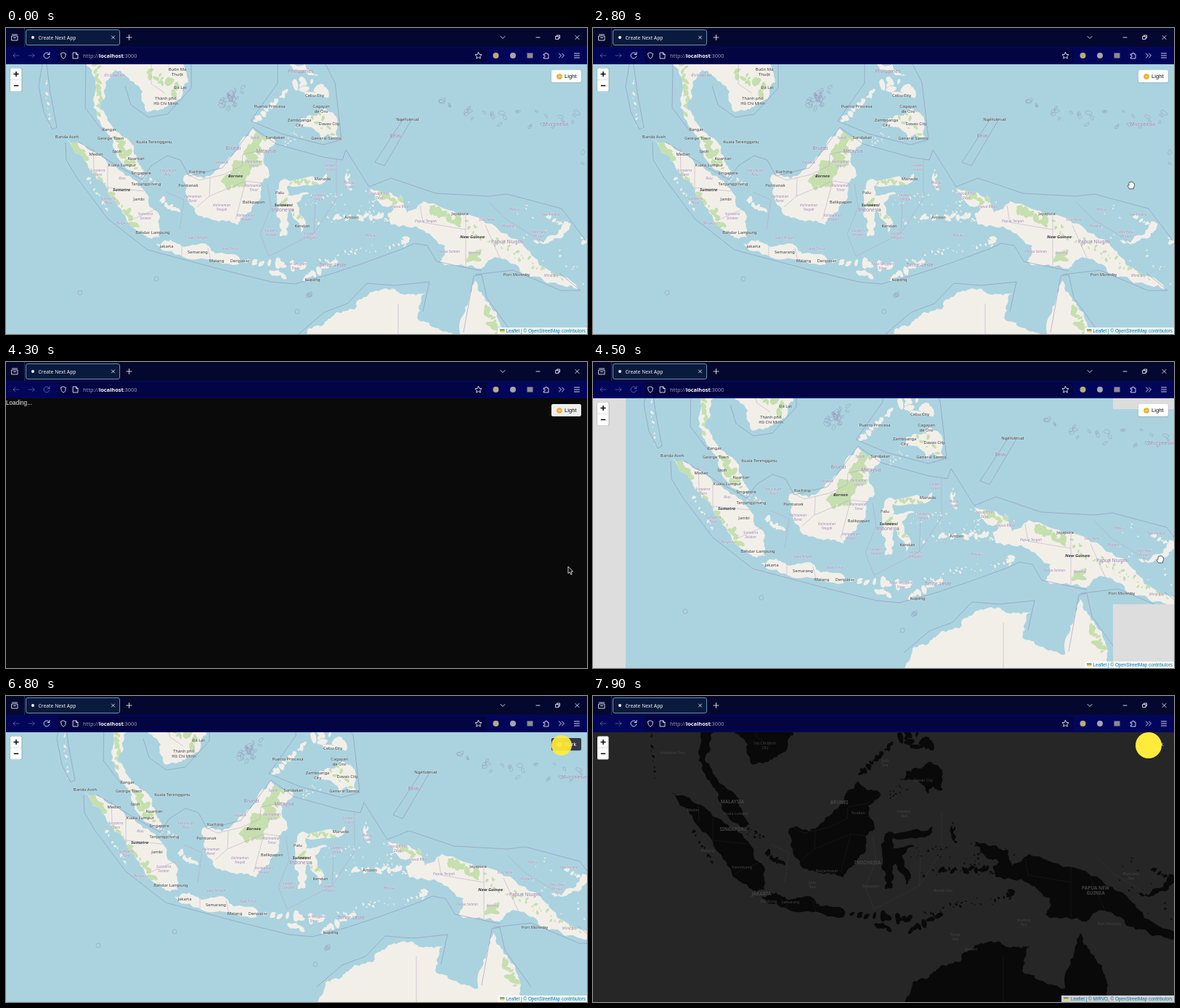
An HTML page that plays this animation: 800x422 px, repeating every 8 s.

```html
<!DOCTYPE html>
<html lang="en">
<head>
<meta charset="utf-8">
<title>Map theme toggle</title>
<style>
html, body { margin: 0; height: 100%; overflow: hidden; background: #0a0a0a; }
svg { display: block; width: 100vw; height: 100vh; }
text { font-family: "Noto Sans", "Open Sans", sans-serif; }
.arial { font-family: "Liberation Sans", Arial, sans-serif; }
.names text { text-anchor: middle; }
#labels text { paint-order: stroke; stroke: #fff8; stroke-width: .7px; }
.city { font-size: 5.8px; fill: #333; }
.country { font-size: 6.7px; fill: #8d76a3; }
.isle { font-size: 6px; font-weight: 700; font-style: italic; fill: #333; }
.prov { font-size: 4.7px; font-style: italic; fill: #9a80ae; }
.dim { font-size: 5.2px; fill: #454545; }
.big { font-size: 6.4px; font-weight: 600; fill: #454545; }
.icon { fill: none; stroke: #e8e8f4; stroke-width: .9; stroke-linecap: round; stroke-linejoin: round; }
</style>
</head>
<body>
<svg viewBox="0 0 800 422" preserveAspectRatio="none">
<defs>
  <radialGradient id="sun"><stop offset="0" stop-color="#ffd75a"/><stop offset="1" stop-color="#dfa024"/></radialGradient>
  <clipPath id="page"><rect y="50" width="800" height="372"/></clipPath>
  <clipPath id="coast"><path id="land"/></clipPath>
</defs>

<g clip-path="url(#page)">
  <g id="light">
    <rect y="50" width="800" height="372" fill="#aad3df"/>
    <g class="pan">
      <use href="#land" fill="#f2efe9"/>
      <path id="forest" clip-path="url(#coast)" fill="#c5dfae"/>
      <path id="reefs" fill="none" stroke="#8f8db0" stroke-width=".6" opacity=".75"/>
      <path id="borders" fill="none" stroke="#8f84b3" stroke-width=".7" opacity=".75"/>
      <path id="inner" fill="none" stroke="#b5a0bd" stroke-width=".5"/>
      <g id="labels" class="names"></g>
    </g>
    <path id="missing" fill="#ddd" d="M0 50H45V422H0ZM716 50H800V65H716ZM716 334H800V422H716Z"/>
  </g>
  <g id="dark">
    <rect y="50" width="800" height="372" fill="#262626"/>
    <g class="pan">
      <use href="#land" fill="#090909"/>
      <use href="#inner" opacity=".15"/>
      <g id="darkLabels" class="names"></g>
    </g>
  </g>
  <rect x="5.5" y="55" width="17" height="33" rx="2" fill="#0003"/>
  <rect x="6" y="55.5" width="15.5" height="32" rx="1.5" fill="#fff"/>
  <path d="M6 71.5H21.5" stroke="#ccc" stroke-width=".6"/>
  <path d="M10.5 63.5H17.5M14 60V67M10.8 79.5H17.2" stroke="#000" stroke-width="1.4"/>
  <g id="credit">
    <rect y="413" width="160" height="9" fill="#fffc"/>
    <path d="M3 415.5h6.5v2H3z" fill="#4c7be1"/><path d="M3 417.5h6.5v2H3z" fill="#ffd500"/>
  </g>
  <text id="creditText" class="arial" x="798" y="419.7" text-anchor="end" font-size="6.3" fill="#0078a8"></text>
  <g id="loading">
    <rect y="50" width="800" height="372" fill="#0a0a0a"/>
    <text class="arial" y="59.2" font-size="8.2" fill="#ededed">Loading...</text>
  </g>
  <rect x="750.5" y="58" width="42" height="18" rx="2.5" fill="#0002"/>
  <rect id="button" x="751" y="58" width="41" height="17" rx="2.2"/>
  <circle cx="762" cy="67" r="3.8" fill="url(#sun)"/>
  <text id="mode" class="arial" x="769" y="69.3" font-size="7.7"></text>
  <g id="status">
    <rect y="410" width="154.5" height="12" fill="#1c1b22"/>
    <text x="2" y="418.7" font-size="6.6" fill="#f4f4f8">Waiting for localhost...</text>
  </g>
</g>

<rect width="800" height="26" fill="#05082e"/>
<rect y="26" width="800" height="24" fill="#02065a"/>
<rect x="71" y="28" width="591" height="20" rx="2" fill="#030442"/>
<path d="M25.5 0V26" stroke="#22305c"/>
<rect x="27.5" y="2.5" width="129" height="21" rx="2.5" fill="#0a1a3c" stroke="#6391b5"/>
<circle id="favicon" cx="37" cy="13" r="2" fill="#fff"/>
<circle id="spinner" cy="13" r="1.1" fill="#6db4ff"/>
<text x="44.5" y="15.6" font-size="6.8" fill="#f4f4fa">Create Next App</text>
<g class="icon">
  <path d="M145.5 11l4 4m0-4l-4 4M166 13h7M169.5 9.5v7M681 11.500l3 3 3-3M730 13h5M757 11.500h4v4h-4zM758.500 11.500v-1.500h4v4h-1.500M784 10.500l5 5m0-5l-5 5"/>
  <path d="M8 11h8v6H8zM8.500 9h7M10.500 13.500h3"/>
  <path d="M18 38h-8m3-3l-3 3 3 3M31 38h8m-3-3l3 3-3 3" opacity=".35"/>
  <path id="reload" d="M59.500 36a4 4 0 1 0 .4 3M60 33.500v3h-3"/>
  <path id="stop" d="M53 35l6 6m0-6l-6 6"/>
  <path d="M79 34l3.500 1.500q0 5-3.500 7-3.500-2-3.500-7zM92.500 34h4l2.500 2.500v5.500h-6.500zM96.500 34v2.500h2.500"/>
  <path d="M650.500 33.500l1.400 2.900 3.100.4-2.300 2.200.6 3.100-2.800-1.500-2.800 1.500.6-3.100-2.300-2.200 3.100-.4z"/>
  <path d="M740.500 36h2a1.300 1.300 0 1 1 2.500 0h2v6h-6.500v-2a1.300 1.300 0 1 0 0-2.500zM761.500 35l3 3-3 3M765.500 35l3 3-3 3M782.500 35h7M782.500 38h7M782.500 41h7"/>
</g>
<circle cx="674.500" cy="38" r="4" fill="#b9ad79"/>
<circle cx="698" cy="38" r="4" fill="#a5a5ae"/>
<rect x="717.500" y="34.500" width="8" height="7" fill="#8b8b90"/>
<text x="106" y="40.700" font-size="7.400" fill="#9a9bb8">http://<tspan fill="#fff" font-weight="600">localhost</tspan>:3000</text>

<circle id="click" cx="765" cy="68" fill="#ffeb3b"/>
<g id="cursor">
  <path id="arrow" d="M0 0V9.500L2.200 7.500 3.700 11 5.300 10.300 3.800 7H6.700Z" stroke="#fff" stroke-width=".8"/>
  <path id="hand" d="M-2.500 5L-5 .5Q-4.500-1-3 .5V-3.500Q-2-5-1.200-3.500-.5-6 .8-4.500 2.500-5.500 3-3 5-3 4.600-.5L3.300 5Z" fill="#fff" stroke="#000" stroke-width=".6"/>
</g>
</svg>

<script>
const el = id => document.getElementById(id);
const set = (id, attrs) => { for (const k in attrs) el(id).setAttribute(k, attrs[k]); };
let seed = 7;
const rnd = () => (seed = seed * 16807 % 2147483647) / 2147483647;
const spread = size => (rnd() * 2 - 1) * size;

// Rough coast: split each side of a simple outline, pushing midpoints sideways
function coast(outline) {
  let pts = outline.match(/\d+ \d+/g).map(p => p.split(' ').map(Number));
  for (let pass = 0; pass < 3; pass++)
    pts = pts.flatMap(([x, y], i) => {
      const [u, v] = pts[(i + 1) % pts.length];
      const push = spread(Math.min(.22, 3.5 / Math.hypot(u - x, v - y)));
      return [[x, y], [(x + u) / 2 + (v - y) * push, (y + v) / 2 - (u - x) * push]];
    });
  return 'M' + pts.map(p => p.map(n => n.toFixed(1))).join(' ') + 'Z';
}

// Small jagged blobs scattered along a line
function scatter(x0, y0, x1, y1, width, count, size) {
  let d = '';
  for (let i = 0; i < count; i++) {
    const k = (i + rnd()) / count, r = size * (.4 + rnd() * .8), turn = rnd() * 3;
    const x = x0 + (x1 - x0) * k + spread(width), y = y0 + (y1 - y0) * k + spread(width);
    const corner = (_, j) => {
      const a = j * Math.PI / 4, p = r * Math.cos(a) * 1.5, q = r * Math.sin(a) * (.5 + rnd() * .5);
      return [x + p * Math.cos(turn) - q * Math.sin(turn), y + p * Math.sin(turn) + q * Math.cos(turn)].map(n => n.toFixed(1));
    };
    d += 'M' + Array.from({ length: 8 }, corner).join(' ') + 'Z';
  }
  return d;
}

const land = [
  // Mainland and peninsula, Sumatra, Borneo, Sulawesi, Java
  coast('110 40 118 62 123 88 120 110 136 138 147 160 158 184 185 206 190 198 180 178 172 158 147 137 137 120 130 104 137 75 150 58 175 74 188 88 195 116 216 112 240 98 251 75 246 40'),
  coast('82 153 108 161 146 189 183 217 212 260 212 289 190 286 160 255 137 217 112 187'),
  coast('246 203 281 204 312 176 340 138 357 150 371 158 354 172 363 204 350 215 350 236 336 254 320 271 297 265 265 259 250 232'),
  coast('376 216 385 208 434 207 443 200 438 213 388 217 386 233 418 228 400 241 413 268 406 282 391 252 387 286 377 287 372 256'),
  coast('207 298 220 293 245 302 278 300 288 311 322 318 320 326 262 319 216 307'),
  // New Guinea, Australia, Mindanao, Luzon, New Britain
  coast('500 222 530 227 547 234 552 255 575 239 630 256 690 284 716 304 734 327 785 354 788 360 745 352 715 339 690 320 665 320 655 332 598 322 605 300 575 279 530 271 525 256 534 250 512 238'),
  coast('404 450 415 416 438 408 455 392 480 388 490 374 505 364 525 360 550 368 578 364 570 390 568 403 595 414 625 424 632 385 646 348 660 376 676 393 684 420 690 450'),
  coast('400 139 406 125 430 118 440 112 455 122 457 150 443 146 436 157 427 142 412 136'),
  coast('385 45 412 50 433 66 420 65 400 58'),
  coast('725 293 760 284 769 266 778 270 766 289 740 298'),
  // Island arcs
  scatter(343, 129, 388, 85, 1, 16, 3.5), scatter(392, 78, 448, 92, 11, 12, 5), scatter(385, 160, 405, 140, 8, 16, 1),
  scatter(327, 322, 412, 328, 2, 11, 5), scatter(364, 336, 382, 341, 2, 4, 4), scatter(408, 346, 456, 322, 1, 10, 4),
  scatter(470, 193, 472, 224, 3, 9, 3), scatter(453, 262, 520, 259, 2, 12, 4), scatter(215, 238, 238, 253, 3, 8, 3.5),
  scatter(550, 288, 550, 302, 1, 4, 4), scatter(745, 259, 773, 275, 1, 8, 2.5), scatter(790, 285, 798, 297, 1, 3, 3),
  scatter(112, 203, 142, 256, 2, 10, 2.5), scatter(54, 70, 60, 135, 2, 9, 1.8), scatter(190, 206, 206, 218, 6, 18, 1.4),
  scatter(410, 250, 545, 245, 22, 60, 1.2), scatter(430, 322, 545, 295, 8, 24, 1.5), scatter(700, 250, 790, 350, 16, 20, 1.2)
].join('');

const forest = [
  scatter(88, 158, 112, 184, 4, 14, 5), scatter(120, 200, 188, 283, 3, 26, 4), scatter(126, 50, 130, 120, 3, 18, 4),
  scatter(150, 150, 176, 190, 5, 18, 4), scatter(195, 60, 240, 85, 8, 14, 4), scatter(352, 152, 338, 176, 6, 18, 6),
  scatter(336, 180, 310, 214, 9, 30, 7), scatter(390, 212, 430, 213, 2, 8, 3), scatter(380, 235, 405, 265, 4, 10, 3),
  scatter(510, 228, 545, 238, 5, 10, 4), scatter(582, 248, 624, 268, 4, 16, 5), scatter(636, 318, 658, 312, 5, 10, 5),
  scatter(660, 385, 678, 420, 3, 12, 5), scatter(400, 90, 445, 140, 9, 24, 3), scatter(620, 265, 770, 350, 6, 40, 2)
].join('');

const ring = (x, y) => `M${x - 3} ${y}a3 3.200 0 1 0 6 0a3 3.200 0 1 0-6 0`;
const reefs = [scatter(300, 108, 322, 88, 9, 24, 3), scatter(590, 108, 690, 125, 10, 14, 3), scatter(690, 125, 792, 128, 12, 14, 3),
  scatter(414, 366, 422, 370, 2, 3, 3), scatter(793, 155, 795, 205, 2, 2, 3), ring(102, 365), ring(207, 346), ring(401, 391)].join('');

set('land', { d: land });
set('forest', { d: forest });
set('reefs', { d: reefs });
set('borders', { d: `M82 158L83 182 98 207 140 263 195 306 300 334 365 350 397 353 445 340 490 325 545 305 562 297 580 300 593 322 655 335
  M100 157L150 188 187 209 200 190 222 176 240 182 252 204 298 193 340 137 372 160 437 178 463 182 468 168 500 219 530 207 592 228 665 232 690 229 765 249 799 294
  M50 50L45 80 52 116 64 140 70 137 61 89 56 50M110 50L109 110 134 143M255 50V83L222 119 196 123 172 106 164 80
  M374 50V76L337 128 380 146 437 161 462 154 453 75 440 50M508 185L548 124 558 127 521 190ZM646 340L698 334 764 362 791 362 762 338
  M403 422L438 392 470 380 497 352 535 355 583 350 574 391M630 420L644 342 655 340 662 372 698 422` });
set('inner', { d: `M250 202L266 210 300 202 325 190 326 174 357 168M633 255V329M281 207L280 232 263 247M280 232L330 211 352 214M316 264L330 212
  M570 244L574 268 633 278M120 165L121 195M140 187V220L190 225M172 265L208 249M242 302V314M278 303L282 321M660 272L680 317M540 380V450
  M200 50V77L219 90M360 215L365 247 350 284 362 315 424 283 426 238M455 180V235L424 283M220 226L245 237 239 278M665 240L690 265 740 295` });

// Place names: "first line/second line x y", centred
function names(parent, cls, list, gap = 5.500) {
  for (const item of list.split('|')) {
    const [, name, x, y] = item.match(/(.+) (\d+) (\d+)$/);
    name.split('/').forEach((row, i) => {
      const text = document.createElementNS('http://www.w3.org/2000/svg', 'text');
      text.setAttribute('class', cls);
      text.setAttribute('x', x);
      text.setAttribute('y', +y + 2 + i * gap);
      text.textContent = row;
      el(parent).append(text);
    });
  }
}
names('labels', 'prov', 'Sumatera/Utara 126 196|Riau 160 207|Sumatera/Barat 141 235|Bengkulu 161 269|Sumatera/Selatan 192 256|Kepulauan/Riau 223 196|Sarawak 297 185|Sabah 343 151|Kalimantan/Barat 257 232|Kalimantan/Tengah 297 244|Kalimantan/Selatan 330 258|Kalimantan/Utara 341 184|Kalimantan/Timur 341 217|Jawa Tengah 264 289|Jawa Timur 308 304');
names('labels', 'prov', 'Sulawesi/Selatan 365 279|Sulawesi/Tenggara 419 283|Sulawesi/Tengah 430 230|Sulawesi/Utara 447 189|Maluku 503 286|Maluku/Utara 473 213|Papua Barat/Daya 514 228|Papua Barat 543 246|Papua Tengah 578 266|Papua Selatan 610 308|East Sepik 662 264|Western 645 310|Manus 700 250|Madang 692 273|New Ireland 750 257|West New/Britain 734 281|Milne Bay 751 341|Nusa Tenggara/Timur 399 325');
names('labels', 'city', 'Banda Aceh 84 150|Medan 124 174|Kangar 142 140|George Town 144 152|Ipoh 153 170|Kuantan 179 180|Kuala Lumpur 160 189|Kuala Terengganu 204 157|Singapore 186 200|Tanjungpinang 193 215|Pontianak 251 217|Kuching 263 198|Jambi 183 236|Bandar Lampung 202 282|Jakarta 221 301|Semarang 264 309|Malang 290 321|Denpasar 322 321|Balikpapan 341 240|Palu 377 227', 6.500);
names('labels', 'city', 'Manado 436 208|Kendari 408 273|Ambon 476 261|Kupang 422 347|Jayapura 625 256|Port Moresby 703 340|Ngerulmud 553 126|General Santos 441 152|Davao City 445 132|Zamboanga/City 404 127|Cagayan/de Oro 434 108|Cebu City 425 93|Puerto Princesa 363 108|Sandakan 371 151|Thành phố/Hồ Chí Minh 220 97|Đà Lạt 240 82|Buôn Ma/Thuột 236 57', 6.500);
names('labels', 'country', 'Philippines 406 60|Malaysia 358 170|Brunei 313 166|Indonesia 381 251|Belau 537 149|Micronesia 757 133|Papua Niugini 690 295|Timor-Leste 450 327|ประเทศไทย 149 65');
names('labels', 'isle', 'Sumatra 159 223|Borneo 316 204|New Guinea 642 288|Sulawesi 382 244');
names('darkLabels', 'big', 'MALAYSIA 167 167|SINGAPORE 168 205|JAKARTA 207 294|INDONESIA 353 251|PAPUA NEW/GUINEA 667 286|BRUNEI 314 168', 7);
names('darkLabels', 'dim', 'Medan 113 178|Kuala Lumpur 172 183|Palembang 180 257|Bandung 217 304|Semarang 247 305|Banjarmasin 297 262|Makassar 358 283|Tarakan 340 182|Java/Sea 277 278|Celebes/Sea 403 180|Davao City 430 137|Sulu/Sea 377 110|Banda Sea 457 289|Arafura/Sea 568 330|Timor/Sea 474 350|Darwin 496 370|Bismarck/Sea 716 266|Port Moresby 686 335|Padang 133 234|Andaman Sea 84 99|Ho Chi Minh/City 212 86');

// Cursor path: time, x, y
const stops = [[1000, 806, 150], [1700, 766, 97], [2100, 766, 97], [2700, 738, 215], [3400, 791, 248], [3800, 791, 248], [4300, 774, 282], [4500, 781, 272], [5400, 784, 265], [6300, 765, 68], [8000, 765, 68]];
function cursorAt(t) {
  const i = Math.max(1, stops.findIndex(s => s[0] >= t));
  const [t0, x0, y0] = stops[i - 1], [t1, x1, y1] = stops[i];
  const k = Math.max(0, (t - t0) / (t1 - t0)), e = k * k * (3 - 2 * k);
  return [x0 + (x1 - x0) * e, y0 + (y1 - y0) * e];
}
const show = (id, on) => el(id).style.display = on ? '' : 'none';

const start = performance.now();
function draw(now) {
  const t = Math.floor(Math.max(0, now - start) % 8000 / 100) * 100;
  const within = (a, b) => t >= a && t < b;
  const waiting = within(3300, 3900), loading = within(3900, 4400);
  const toggled = t >= 6700, dark = t >= 7000;

  for (const g of document.querySelectorAll('.pan')) g.setAttribute('transform', t >= 4400 ? 'translate(25 -21)' : '');
  show('light', !dark);
  show('dark', dark);
  show('missing', within(4400, 4600));
  show('loading', loading);
  show('status', waiting);
  show('stop', waiting);
  show('spinner', waiting);
  show('reload', !waiting);
  show('favicon', !waiting);
  set('reload', { opacity: within(3900, 4700) ? .4 : 1 });
  set('spinner', { cx: 37 + 3 * Math.sin((t - 3700) / 160) });

  set('button', { fill: dark ? '#23262c' : toggled ? '#343b47' : loading ? '#eee' : '#fff' });
  set('mode', { fill: toggled ? '#fff' : '#111' });
  el('mode').textContent = toggled ? 'Dark' : 'Light';
  set('credit', { transform: `translate(${dark ? 645 : 677})` });
  el('creditText').textContent = `Leaflet | © ${dark ? 'MIRVO, © ' : ''}OpenStreetMap contributors`;

  const [x, y] = cursorAt(t);
  const press = within(6500, 6700) || t >= 7800;
  const radius = press ? 18 : within(6700, 6950) ? 18 - (t - 6700) * .04 : 0;
  const arrow = within(3200, 4400) || y < 76;
  set('cursor', { transform: `translate(${x} ${y})` });
  show('cursor', t >= 1000 && !radius);
  show('arrow', arrow);
  show('hand', !arrow);
  set('click', { r: radius, opacity: press ? 1 : .92 });
  requestAnimationFrame(draw);
}
requestAnimationFrame(draw);
</script>
</body>
</html>
```
